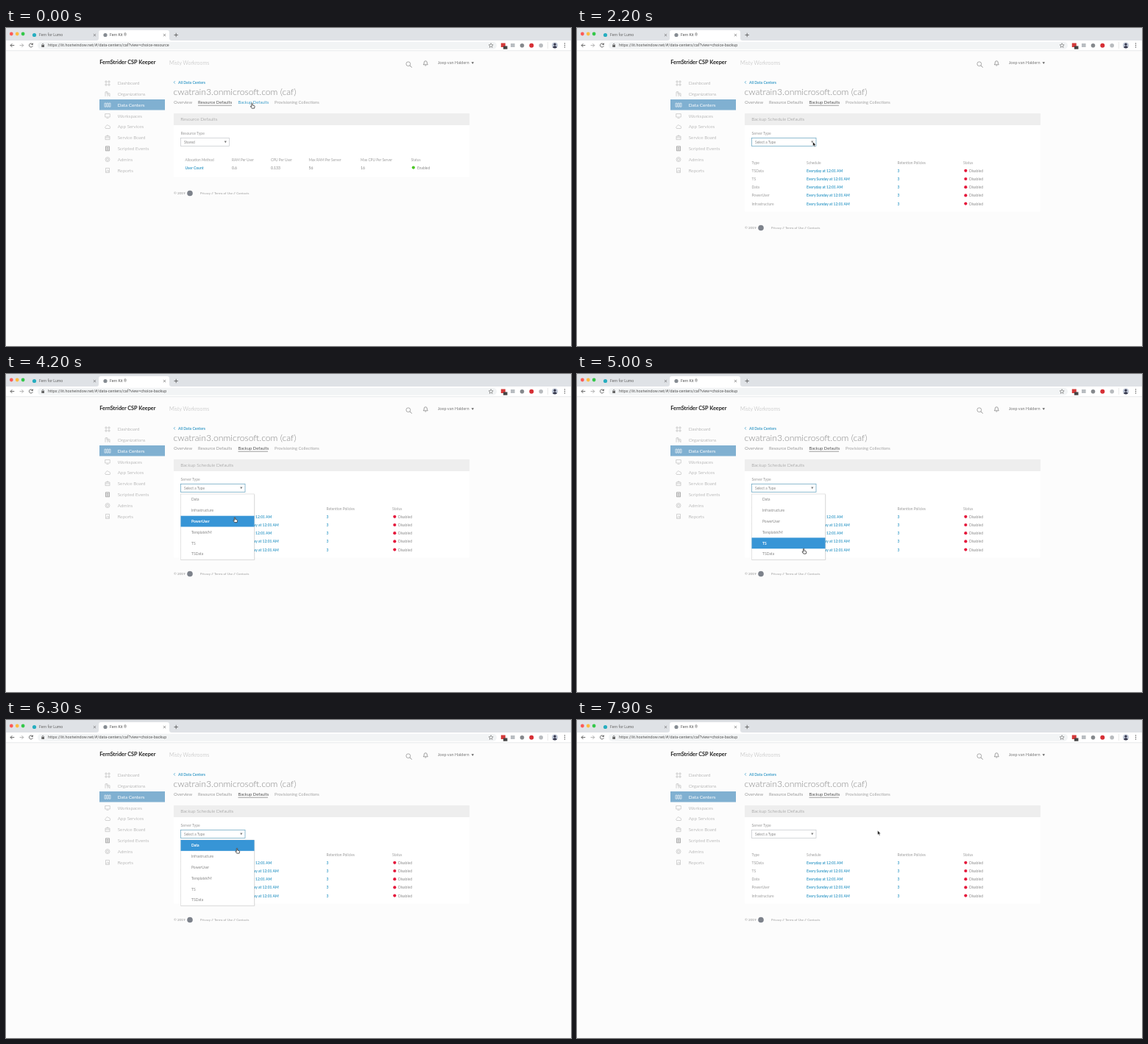
These frames come from a looping animation (768 px wide and 432 px high, 8000 ms). An HTML page:

```html
<!DOCTYPE html>
<html lang="en">
<head>
<meta charset="utf-8">
<title>Data center defaults</title>
<style>
  html, body { margin: 0; width: 100%; height: 100%; overflow: hidden; background: #fcfcfc; }
  svg { display: block; width: 768px; height: 432px; }
  text { font-family: Lato, "Open Sans", sans-serif; white-space: pre; }
  .ui { font-family: Roboto, Inter, sans-serif; }
</style>
</head>
<body>
<svg id="stage" viewBox="0 0 768 432" xmlns="http://www.w3.org/2000/svg"></svg>
<script>
const LOOP = 8000, STEP = 100;
const SWAP = 400, FOCUS = 2200, OPEN = 2800, CLOSE = 7200;
const ITEM_TOP = 163, ITEM_H = 14.85;
const BLUE = '#3f9fca', GREY = '#8c8c8c', PALE = '#9c9c9c', BORDER = '#c3c7ca';

// Drawing helpers return SVG markup
const text = (x, y, s, size, fill = GREY, weight = 400, extra = '') =>
  `<text x="${x}" y="${y}" font-size="${size}" fill="${fill}" font-weight="${weight}" ${extra}>${s}</text>`;
const rect = (x, y, w, h, fill, extra = '') =>
  `<rect x="${x}" y="${y}" width="${w}" height="${h}" fill="${fill}" ${extra}/>`;
const dot = (x, y, r, fill, extra = '') => `<circle cx="${x}" cy="${y}" r="${r}" fill="${fill}" ${extra}/>`;
const line = (d, stroke, width = 0.8, extra = '') =>
  `<path d="${d}" fill="none" stroke="${stroke}" stroke-width="${width}" ${extra}/>`;
const group = (id, body, extra = '') => `<g id="${id}" ${extra}>${body}</g>`;
const ui = (x, y, s, size, fill, extra = '') => text(x, y, s, size, fill, 400, `class="ui" ${extra}`);

function browserBar() {
  const lights = ['#fc5b57', '#fdbc40', '#34c84a'].map((c, i) => dot(7.3 + i * 7.9, 8, 2.4, c)).join('');
  const closeMark = x => line(`M${x - 1.6} 8l3.2 3.2m0-3.2l-3.2 3.2`, '#666', 0.7);
  return rect(0, 0, 768, 17, '#dfe2e6') + lights +
    '<path d="M123 17q3 0 3-3V6q0-3 3-3h90q3 0 3 3v8q0 3 3 3z" fill="#fff"/>' +
    rect(0, 17, 768, 14, '#fff') + rect(0, 30.5, 768, 0.7, '#dddfe1') +
    dot(38.5, 9.5, 2.6, '#27aebf') + ui(45, 11.4, 'Fern for Lumo', 5.2, '#666') + closeMark(120.5) +
    dot(135, 9.5, 2.6, '#858b91') + ui(141, 11.4, 'Fern Kit ®', 5.2, '#555') + closeMark(215.5) +
    line('M228.5 9.5h5.4M231.2 6.8v5.4', '#555') +
    line('M11.3 23.6H6m2.4-2.4L6 23.6 8.4 26', '#555', 0.9) +
    line('M18.6 23.6h5.2m-2.4-2.4l2.4 2.4-2.4 2.4', '#aaa', 0.9) +
    line('M36 22a2.5 2.5 0 1 0 .3 2.4M36.4 20.6v2h-2', '#555', 0.9) +
    rect(43, 18.7, 624, 10, '#f2f4f5', 'rx="5"') +
    rect(48.3, 23, 3.7, 3, '#666') + line('M49 23v-1q1.1-1.8 2.3 0v1', '#666', 0.7) +
    ui(57, 25.4, '', 5.45, '#555', 'id="url"') +
    line('M659.2 20.7l.9 2 2.1.2-1.6 1.4.5 2.1-1.9-1.1-1.9 1.1.5-2.1-1.6-1.4 2.1-.2z', '#666', 0.6) +
    rect(672.8, 20.5, 6, 5.5, '#d43b3b') + rect(676, 24.5, 5.5, 4.2, '#444') +
    rect(686, 21, 5.6, 5, '#b9bdc1') + dot(701.5, 23.7, 2.8, '#85888c') +
    dot(714.3, 23.7, 3, '#d62f35') + dot(727.2, 23.7, 2.8, '#b8bbbe') +
    rect(736.4, 19, 0.6, 9, '#ddd') + dot(746, 23.5, 4, '#c2cad9') +
    dot(746, 22.2, 1.6, '#36384d') + '<path d="M743 26.2q3-4 6 0a4 4 0 0 1-6 0z" fill="#36384d"/>' +
    [21, 23.5, 26].map(y => dot(759.5, y, 0.7, '#555')).join('');
}

const ICONS = [
  'M-3-3h2v2h-2zm4 0h2v2h-2zm-4 4h2v2h-2zm4 0h2v2h-2z',
  'M-3 3v-6h3v6m0-4h3v4zm-2-2h1m-1 2h1',
  'M-4-2.5h2v5h-2zm3 0h2v5h-2zm3 0h2v5h-2z',
  'M-3.3-2.8h6.6v4.4h-6.6zM-1.5 3h3',
  'M-2.5 2.3q-2-2 .4-3 1-3.3 3.8-.8 2.8.8 1.5 3.8z',
  'M-3-2h6v4.6h-6zm0 2h6m-4-2v-1h2v1',
  'M-2.5-3h5v6h-5zm1 1.5h3m-3 1.5h3m-3 1.5h3',
  'M-3 0a3 3 0 1 0 6 0a3 3 0 1 0-6 0m1.5 0a1.5 1.5 0 1 0 3 0a1.5 1.5 0 1 0-3 0',
  'M-2.5-3h5v6h-5zm1 4v1m1.5-3v3m1.5-2v2'
];

function sidebar() {
  const names = ['Dashboard', 'Organizations', 'Data Centers', 'Workspaces', 'App Services',
    'Service Board', 'Scripted Events', 'Admins', 'Reports'];
  return rect(127, 97, 89, 14.5, '#80b0d1') + names.map((name, i) => {
    const y = 75 + i * 14.8, on = i === 2;
    return line(ICONS[i], on ? '#fff' : i === 6 ? '#777' : '#b8b8b8', 0.6, `transform="translate(138 ${y})"`) +
      text(151.7, y + 2.2, name, 6.4, on ? '#fff' : '#8c8c8c', on ? 400 : 300);
  }).join('');
}

function pageHeader() {
  return text(127.3, 49, 'FernStrider CSP Keeper', 7.3, '#222', 700) +
    text(222, 49.8, 'Misty Workrooms', 7.1, '#b0b0b0', 300) +
    dot(546.8, 48.8, 2.9, 'none', 'stroke="#999" stroke-width=".8"') + line('M549 51l2.7 2.7', '#999', 1) +
    line('M567.3 49.8q1-1 1-3 0-2 2-2t2 2q0 2 1 3zM569.5 51h1.6', '#777', 0.7) +
    text(587, 49.4, 'Joep van Haldern', 5.6, '#777') +
    '<path d="M632.6 46.3h3.4l-1.7 2.7z" fill="#666"/>' +
    line('M229.8 72l-1.7 1.8 1.7 1.8', BLUE, 0.7) + text(234, 75.7, 'All Data Centers', 5.1, BLUE, 700) +
    text(227.5, 91, 'cwatrain3.onmicrosoft.com (caf)', 12.2, '#858585', 300) +
    text(228, 102.9, 'Overview', 5.9, '#999') +
    text(261, 102.9, 'Resource Defaults', 5.8, GREY, 400, 'id="resourceTab"') +
    text(315.5, 102.9, 'Backup Defaults', 5.8, GREY, 400, 'id="backupTab"') +
    text(365, 102.9, 'Provisioning Collections', 5.8, '#a2a2a2') +
    rect(261, 104.8, 46, 0.7, '#777', 'id="underline"');
}

function panel(title, bottom, footY) {
  return rect(228, 132, 402, bottom - 132, '#fff') + rect(228, 116, 402, 16, '#eee') +
    text(237.3, 126, title, 6.4, '#858585', 300) +
    text(228, footY + 1.7, '© 2019', 4.6, '#8c8c8c') + dot(250, footY, 3.8, '#7d828b') +
    text(264, footY + 1.6, 'Privacy // Terms of Use // Contacts', 4.4, PALE);
}

const select = (label, value, w) =>
  text(237.5, 145, label, 5.1, '#999') +
  rect(237.5, 149.3, w, 11, '#fff', `class="field" stroke="${BORDER}" stroke-width=".7"`) +
  text(242, 156.6, value, 4.9, '#888') +
  `<path d="M${235 + w - 4.3} 153.4h3.2l-1.6 2.8z" fill="#777"/>`;

function resourceView() {
  const cols = [[243.5, 'Allocation Method', 'User Count'], [307, 'RAM Per User', '0.6'],
    [360, 'CPU Per User', '0.133'], [411.5, 'Max RAM Per Server', '56'],
    [482, 'Max CPU Per Server', '16'], [550.5, 'Status', '']];
  return panel('Resource Defaults', 202.5, 224.5) + select('Resource Type', 'Shared', 66) +
    cols.map(([x, head, value], i) => text(x, 181.3, head, 4.8, PALE) +
      text(x, 191.6, value, 5, i ? '#808080' : BLUE, i ? 400 : 700)).join('') +
    dot(553.8, 189.6, 2.1, '#4bc724') + text(559, 191.6, 'Enabled', 4.9, GREY);
}

function backupView() {
  const types = ['TSData', 'TS', 'Data', 'PowerUser', 'Infrastructure'];
  const heads = [[237.5, 'Type'], [312, 'Schedule'], [435.5, 'Retention Policies'], [525, 'Status']];
  return panel('Backup Schedule Defaults', 249.5, 271.5) + select('Server Type', 'Select a Type', 87.5) +
    heads.map(([x, s]) => text(x, 185.2, s, 4.9, PALE)).join('') +
    types.map((type, i) => {
      const y = 195.7 + i * 11.2, day = i % 2 || i === 4 ? 'Every Sunday' : 'Everyday';
      return text(237.5, y, type, 5, PALE) + text(312, y, day + ' at 12:01 AM', 5, BLUE, 700) +
        text(435.5, y, '3', 5, BLUE, 700) + dot(528.3, y - 1.9, 2.1, '#e5193c') +
        text(533, y, 'Disabled', 5, GREY);
    }).join('');
}

const ITEMS = ['Data', 'Infrastructure', 'PowerUser', 'TemplateVM', 'TS', 'TSData'];
const menu = () => rect(238, 163.8, 100.3, 89, '#000', 'opacity=".12"') +
  rect(237.5, ITEM_TOP, 100, 89.2, '#fff', 'stroke="#d2d2d2" stroke-width=".6"') +
  rect(237.5, ITEM_TOP, 100, ITEM_H, '#3795d6', 'id="hover"') +
  ITEMS.map((s, i) => text(252, ITEM_TOP + 9.1 + i * ITEM_H, s, 5, '#888', 400, 'class="item"')).join('');

const arrow = '<path d="M0 0v6l1.4-1.2 1 2.2 1.1-.5-1-2.1h1.9z" fill="#222" stroke="#fff" stroke-width=".5"/>';
const hand = '<path d="M-.7.5q.7-1 1.4 0V3l2.3.6q.7.3.6 1.1l-.5 2.4h-3.4L-2 4.8q-.2-1 .6-.6l.7.5z" fill="#fff" stroke="#333" stroke-width=".8"/>';

const stage = document.getElementById('stage');
stage.innerHTML = rect(0, 0, 768, 432, '#fcfcfc') + browserBar() + sidebar() + pageHeader() +
  group('resource', resourceView()) + group('backup', backupView()) + group('menu', menu()) +
  group('cursor', group('arrow', arrow) + group('hand', hand));

const $ = id => document.getElementById(id);
const field = $('backup').querySelector('.field');
const items = [...stage.querySelectorAll('.item')];

// time, x, y of the pointer tip
const PATH = [[0, 334.5, 102], [1700, 334.5, 102], [2200, 320.5, 154.5], [3500, 320.5, 154.5],
  [4100, 311, 194.5], [4450, 311, 194.5], [5100, 308, 240], [5350, 308, 236], [5700, 308.5, 211],
  [6300, 314, 174], [6900, 321, 155], [7100, 321, 155], [7800, 408.5, 150], [LOOP, 408.5, 150]];
const ease = u => u * u * (3 - 2 * u);

function pointerAt(t) {
  const i = PATH.findIndex((p, k) => k && t <= p[0]);
  const [t0, x0, y0] = PATH[i - 1], [t1, x1, y1] = PATH[i];
  const u = ease((t - t0) / (t1 - t0));
  return [x0 + (x1 - x0) * u, y0 + (y1 - y0) * u];
}

const show = (id, on) => $(id).setAttribute('display', on ? 'inline' : 'none');
const set = (el, attrs) => Object.entries(attrs).forEach(([k, v]) => el.setAttribute(k, v));

function render(t) {
  const backup = t >= SWAP, open = t >= OPEN && t < CLOSE, focused = t >= FOCUS && t < CLOSE;
  const [x, y] = pointerAt(t);
  const row = open && y >= ITEM_TOP ? Math.floor((y - ITEM_TOP) / ITEM_H) : -1;
  const onTab = y < 106;

  show('resource', !backup);
  show('backup', backup);
  show('menu', open);
  $('url').textContent = 'https://iit.hostwindow.net/#/data-centers/caf?view=choice-' + (backup ? 'backup' : 'resource');
  set($('resourceTab'), { fill: backup ? '#999' : '#555' });
  set($('backupTab'), { fill: backup ? '#555' : BLUE });
  set($('underline'), backup ? { x: 315.5, width: 40.5 } : { x: 261, width: 46 });
  set(field, { stroke: focused ? '#5e9ebc' : BORDER });

  show('hover', row >= 0);
  if (row >= 0) set($('hover'), { y: ITEM_TOP + row * ITEM_H });
  items.forEach((el, i) => set(el, { fill: i === row ? '#fff' : '#888', 'font-weight': i === row ? 700 : 400 }));

  show('hand', onTab || row >= 0);
  show('arrow', !onTab && row < 0);
  set($('cursor'), { transform: `translate(${x} ${y})` });
}

const start = performance.now();
function tick() {
  const t = (performance.now() - start) % LOOP;
  render(Math.floor(t / STEP) * STEP);
  requestAnimationFrame(tick);
}
tick();
</script>
</body>
</html>
```
